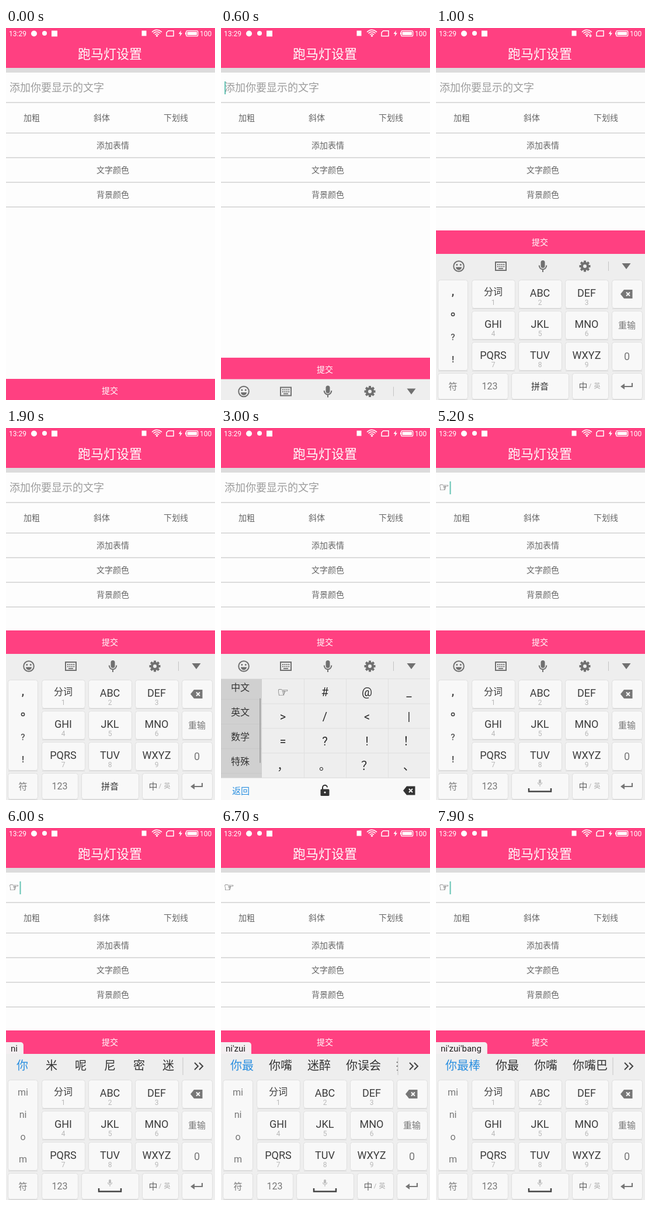
Write an HTML page with a canvas that moves like this. It is 358x634 px and loops after 8 s.

```html
<!DOCTYPE html>
<html lang="zh-CN">
<head>
<meta charset="utf-8">
<title>跑马灯设置</title>
<style>
html, body { margin: 0; width: 100%; height: 100%; overflow: hidden; background: #fdfdfd; }
canvas { display: block; width: 358px; height: 634px; }
</style>
</head>
<body>
<canvas id="stage" width="358" height="634"></canvas>
<script>
const c = document.getElementById('stage').getContext('2d');
const LOOP = 8000, W = 358, H = 634;
const PINK = '#ff4081', LINE = '#dcdcdc', BLUE = '#2a8fe0', DARK = '#3c3c3c', MID = '#777', BOARD = '#eeeeee';
const SANS = 'Roboto, "Noto Sans CJK SC", "DejaVu Sans", sans-serif';
const SYMBOL = '"DejaVu Sans", "Noto Sans CJK SC", sans-serif';

const clamp = v => Math.max(0, Math.min(1, v));
const easeOut = v => 1 - Math.pow(1 - clamp(v), 3);
const within = (t, a, b) => t >= a && t < b;

function rect(x, y, w, h, color) {
  c.fillStyle = color;
  c.fillRect(x, y, w, h);
}

function round(x, y, w, h, r, color, border) {
  c.beginPath();
  c.roundRect(x, y, w, h, r);
  c.fillStyle = color;
  c.fill();
  if (border) {
    c.strokeStyle = border;
    c.lineWidth = 1;
    c.stroke();
  }
}

function disc(x, y, r, color) {
  c.beginPath();
  c.arc(x, y, r, 0, Math.PI * 2);
  c.fillStyle = color;
  c.fill();
}

function path(d, color, width) {
  const p = new Path2D(d);
  if (width) {
    c.strokeStyle = color;
    c.lineWidth = width;
    c.stroke(p);
  } else {
    c.fillStyle = color;
    c.fill(p);
  }
}

// Draws text with its visual middle at y.
function text(s, x, y, size, color, weight = 400, align = 'center') {
  const family = /[\u2190-\u2bff]/.test(s) ? SYMBOL : SANS;
  c.font = `${weight} ${size}px ${family}`;
  c.textAlign = align;
  c.fillStyle = color;
  c.fillText(s, x, y + size * 0.37);
}

function clip(x, y, w, h, draw) {
  c.save();
  c.beginPath();
  c.rect(x, y, w, h);
  c.clip();
  draw();
  c.restore();
}

function at(x, y, draw) {
  c.save();
  c.translate(x, y);
  draw();
  c.restore();
}

/* ---------- page ---------- */

function statusBar(t) {
  const ink = '#fff';
  text('13:29', 5, 9.3, 12, ink, 400, 'left');
  disc(48, 9.5, 5, ink);
  disc(66, 9, 4, ink);
  rect(78, 4.5, 10, 10, ink);
  rect(232.5, 4.5, 8, 9, ink);
  for (const r of [4.5, 8, 11.2]) {
    c.beginPath();
    c.arc(258.5, 14.5, r, -Math.PI * 0.77, -Math.PI * 0.23);
    c.strokeStyle = ink;
    c.lineWidth = 1.5;
    c.stroke();
  }
  disc(258.5, 13.3, 1.6, ink);
  if (within(t, 800, 1800) || within(t, 2400, 2700)) path('M262 13L264.5 10.5L267 13ZM262 13.5H267L264.5 16Z', ink);
  path('M278 4.7H287V13.8H275V7.7Z', ink, 1.5);
  path('M300 4L295.5 10H298.5L297.5 14.5L302 8.5H299Z', ink);
  c.beginPath();
  c.roundRect(308.7, 4.7, 20, 9.2, 2);
  c.strokeStyle = ink;
  c.lineWidth = 1.3;
  c.stroke();
  rect(310.5, 6.5, 16.5, 5.6, ink);
  rect(307, 7.5, 1.5, 3.6, ink);
  text('100', 332, 9.3, 12, ink, 400, 'left');
}

function caretOn(t) {
  const spans = [600, 950, 1300, 1800, 2400, 2900, 3300, 3800, 4300, 4700, 5100, 5600, 5900, 6400, 7000, 7400, 7900, 8000];
  return spans.some((start, i) => i % 2 === 0 && within(t, start, spans[i + 1]));
}

function page(t) {
  rect(0, 0, W, H, '#fdfdfd');
  rect(0, 0, W, 68, PINK);
  statusBar(t);
  text('跑马灯设置', 178, 44, 22, '#fff', 300);
  rect(0, 68, W, 8, LINE);
  for (const y of [126, 178, 220, 262, 304]) rect(0, y, W, 2, LINE);
  const filled = t >= 5050;
  if (filled) text('☞', 5, 101, 20, '#111', 400, 'left');
  else text('添加你要显示的文字', 6, 101, 18, '#9c9c9c', 300, 'left');
  if (caretOn(t)) rect(filled ? 23.5 : 6, 91, 2, 22, '#65c3b4');
  text('加粗', 44, 153, 14, '#666');
  text('斜体', 164, 153, 14, '#666');
  text('下划线', 291, 153, 14, '#666');
  text('添加表情', 183, 200, 14, '#666');
  text('文字颜色', 183, 242, 14, '#666');
  text('背景颜色', 183, 284, 14, '#666');
}

/* ---------- keyboard ---------- */

function backspace(x, y, color) {
  at(x, y, () => {
    path('M-10 0L-4 -7.5H10.5V7.5H-4Z', color);
    path('M0 -3L6 3M6 -3L0 3', '#f8f8f8', 2);
  });
}

function toolbar() {
  const ink = '#707070';
  at(39, 406, () => {
    c.beginPath();
    c.arc(0, 0, 8.8, 0, Math.PI * 2);
    c.strokeStyle = ink;
    c.lineWidth = 2;
    c.stroke();
    disc(-3.2, -2.5, 1.5, ink);
    disc(3.2, -2.5, 1.5, ink);
    path('M-5 1.5H5A5 5 0 0 1 -5 1.5Z', ink);
  });
  at(111, 406, () => {
    path('M-9 -7H9V7H-9Z', ink, 2);
    for (const y of [-4, -0.5]) for (let x = -6; x <= 5; x += 3.4) rect(x, y, 2, 2, ink);
    rect(-4, 3, 8, 1.8, ink);
  });
  at(183, 406, () => {
    round(-3.5, -10, 7, 13, 3.5, ink);
    path('M-6.3 -1.5A6.3 6.8 0 0 0 6.3 -1.5M0 5V10', ink, 2);
  });
  at(255, 406, () => {
    for (let i = 0; i < 8; i++) {
      rect(-2, -9.5, 4, 5, ink);
      c.rotate(Math.PI / 4);
    }
    disc(0, 0, 7.2, ink);
    disc(0, 0, 3, BOARD);
  });
  rect(295, 398, 1, 16, '#c4c4c4');
  path('M318.5 401H333.5L326 411Z', ink);
}

const MAIN = [3000 * 0 + 61, 141, 221];
const LABELS = ['分词', 'ABC', 'DEF', 'GHI', 'JKL', 'MNO', 'PQRS', 'TUV', 'WXYZ'];
const PRESSES = [
  [1780, 1900, '符'], [5600, 5700, 'MNO'], [5800, 5950, 'GHI'], [6200, 6300, 'WXYZ'],
  [6400, 6500, 'TUV'], [6550, 6650, 'GHI'], [7000, 7150, 'ABC']
];
const PINYIN = ['mi', 'ni', 'o', 'm'];
const TYPED = [
  [5700, 'o', '哦 你 没 么 哪 呢', ['o', 'm', 'n']],
  [5900, 'ni', '你 米 呢 尼 密 迷', PINYIN],
  [6300, "ni'x", '你想 你先 你下 你像 你', PINYIN],
  [6500, "ni'zu", '你组 你族 你足 你 米', PINYIN],
  [6650, "ni'zui", '你最 你嘴 迷醉 你误会 拟罪', PINYIN],
  [7100, "ni'zui'a", '你最爱 你嘴 你最 你醉', PINYIN],
  [7400, "ni'zui'ba", '你最把 你最 你嘴 你嘴巴', PINYIN],
  [7600, "ni'zui'bang", '你最棒 你最 你嘴 你嘴巴', PINYIN]
];

function key(x, y, w, h, pressed) {
  rect(x + 1, y + h, w - 2, 1, '#d6d6d6');
  round(x + 0.5, y + 0.5, w - 1, h - 1, 4, pressed ? '#d4d4d4' : '#f8f8f8', '#e0e0e0');
}

function sideList(t, typed) {
  clip(4, 431, 50, 151, () => {
    if (typed) {
      typed[3].forEach((s, i) => text(s, 29, 450 + 38 * i, 16, MID));
      return;
    }
    const k = clamp((t - 1150) / 350);
    const y = 450 - 14 * Math.sin(Math.PI * k);
    text(',', 29, y - 2, 18, DARK, 700);
    c.beginPath();
    c.arc(29, y + 38, 2.6, 0, Math.PI * 2);
    c.strokeStyle = DARK;
    c.lineWidth = 1.5;
    c.stroke();
    text('?', 29, y + 76, 15, '#555', 500);
    text('!', 29, y + 114, 15, '#555', 700);
    if (within(t, 1200, 1500)) rect(52, 433 + 20 * k, 2, 110, '#c0c0c0');
  });
}

function candidates(typed) {
  clip(0, 386, 303, 42, () => {
    let x = 3;
    typed[2].split(' ').forEach((word, i) => {
      const w = Math.max(50, word.length * 20 + 26);
      text(word, x + w / 2, 405, 20, i ? '#333' : BLUE);
      x += w;
    });
  });
  rect(302.5, 391, 1, 30, '#c4c4c4');
  path('M323 400L329 406L323 412M331 400L337 406L331 412', '#444', 2);
}

function popup(s) {
  c.font = `15px ${SANS}`;
  const w = 18 + c.measureText(s).width;
  round(-1, 365, w + 1, 20, [0, 5, 0, 0], '#f4eff1');
  text(s, 8, 375.5, 15, '#222', 400, 'left');
}

function keyboard(t) {
  const typed = TYPED.filter(s => t >= s[0]).pop();
  const held = name => PRESSES.some(p => p[2] === name && within(t, p[0], p[1]));
  if (typed) {
    candidates(typed);
    popup(typed[1]);
  } else toolbar();

  key(3, 429, 52, 155);
  sideList(t, typed);
  LABELS.forEach((s, i) => {
    const x = MAIN[i % 3], y = 429 + 53 * Math.floor(i / 3);
    key(x, y, 75, 49, held(s));
    text(s, x + 37, y + (i ? 22 : 20), i ? 18 : 16, DARK, i ? 400 : 500);
    text(i + 1, x + 37, y + 38.5, 12, '#b8b8b8');
  });
  for (let i = 0; i < 3; i++) key(301, 429 + 53 * i, 53, 49);
  backspace(326, 453.5, MID);
  text('重输', 327, 506, 15, MID);
  text('0', 327, 559, 18, MID);

  key(3, 588, 52, 45, held('符'));
  text('符', 29, 610, 15, MID);
  key(61, 588, 63, 45);
  text('123', 92, 610.5, 16, MID);
  key(129, 588, 99, 45);
  if (t < 2400) text('拼音', 178, 610, 15, '#333', 500);
  else {
    round(176, 599, 4, 7, 2, '#bdbdbd');
    path('M174.5 604A3.5 3.5 0 0 0 181.5 604M178 608V611', '#bdbdbd', 1.2);
    path('M159 614V619.5H197V614', '#444', 2.5);
  }
  key(233, 588, 63, 45);
  text('中', 252, 610, 15, '#666');
  text('/', 264, 610, 11, '#aaa');
  text('英', 276, 610, 11, '#aaa');
  key(301, 588, 53, 45);
  path('M336 605V611H320', MID, 2.2);
  path('M316 611L323 606V616Z', MID);
}

/* ---------- symbol panel ---------- */

const GROUPS = ['常用', '中文', '英文', '数学', '特殊', '序号'];
const COMMON = '☞#@_>/<|=?!！，。？、';
const SPECIAL = '♠♥♣♦✓✔✗✚✘♞♟↪↣♚♛♝☞☜⇔☆★□■○●◇◆△▲▽▼◎';

function returnBadge(x, y) {
  round(x - 10, y - 10, 20, 19, 3, '#4f8fc0');
  path(`M${x - 6} ${y - 3}H${x + 3}A3 3 0 0 1 ${x + 3} ${y + 4}H${x - 4}M${x - 1} ${y + 1}L${x - 4} ${y + 4}L${x - 1} ${y + 7}`, '#fff', 1.8);
}

function grid(t) {
  const special = t >= 3800;
  const off = special ? 100 * easeOut((t - 4150) / 550) : 0;
  clip(70, 428, 288, 168, () => {
    [...(special ? SPECIAL : COMMON)].forEach((s, i) => {
      const col = i % 4, row = Math.floor(i / 4);
      const x = 70 + 72 * col, y = 428 + 42 * row - off;
      if (special && s === '☞' && within(t, 5000, 5100)) rect(x, y, 72, 42, '#d4d4d4');
      rect(x, y + 41.5, 72, 1, '#e0e0e0');
      if (col) rect(x, y, 1, 42, '#e0e0e0');
      if (s === '↪') returnBadge(x + 36, y + 21.5);
      else text(s, x + 36, y + 22, s === '☞' || s === '☜' ? 22 : 20, '#2c2c2c', /[！，。？、]/.test(s) ? 500 : 400);
    });
    if (off > 0) rect(354, 428 + off * 0.287, 2, 41, '#b0b0b0');
  });
}

function groupList(t) {
  const off = 84 * clamp((t - 2860) / 240);
  const chosen = t < 3700 ? 0 : 4;
  rect(0, 428, 70, 168, '#d0d0d0');
  clip(0, 428, 70, 168, () => {
    GROUPS.forEach((s, i) => {
      const y = 428 + 42 * i - off;
      if (i === chosen) rect(0, y, 70, 42, BOARD);
      else rect(0, y + 41, 70, 1, '#c9c9c9');
      text(s, 33, y + 21, 16, '#333', 500);
    });
    if (within(t, 2880, 3750)) rect(66, 428 + off * 2 / 3, 2, 110, '#a4a4a4');
  });
}

function symbolPanel(t) {
  toolbar();
  rect(0, 427, W, 1, '#e0e0e0');
  grid(t);
  groupList(t);
  rect(0, 596, W, 38, '#f9f9f9');
  rect(0, 596, W, 1, '#e2e2e2');
  if (t >= 5100) rect(0, 597, 70, 37, '#dcdcdc');
  text('返回', 34, 618, 15, BLUE, 500);
  round(170.5, 615.5, 15, 11.5, 1.5, '#333');
  path('M174 616V613A4 4 0 0 1 182 612.5', '#333', 2);
  disc(178, 621, 1.6, '#f9f9f9');
  backspace(322, 618, '#333');
}

/* ---------- timeline ---------- */

function draw(t) {
  page(t);
  const open = easeOut((t - 580) / 400);
  const shift = 249 * (1 - open);
  const barY = 598 - 253 * open;
  rect(0, barY, W, 40, PINK);
  text('提交', 178, barY + 20, 14, '#fff', 500);
  if (!open) return;
  at(0, shift, () => {
    rect(0, 385, W, 249, BOARD);
    if (within(t, 2400, 5200)) symbolPanel(t);
    else keyboard(t);
  });
}

let start;
function frame(now) {
  if (start === undefined) start = now;
  draw((now - start) % LOOP);
  requestAnimationFrame(frame);
}
draw(0);
requestAnimationFrame(frame);
</script>
</body>
</html>
```
